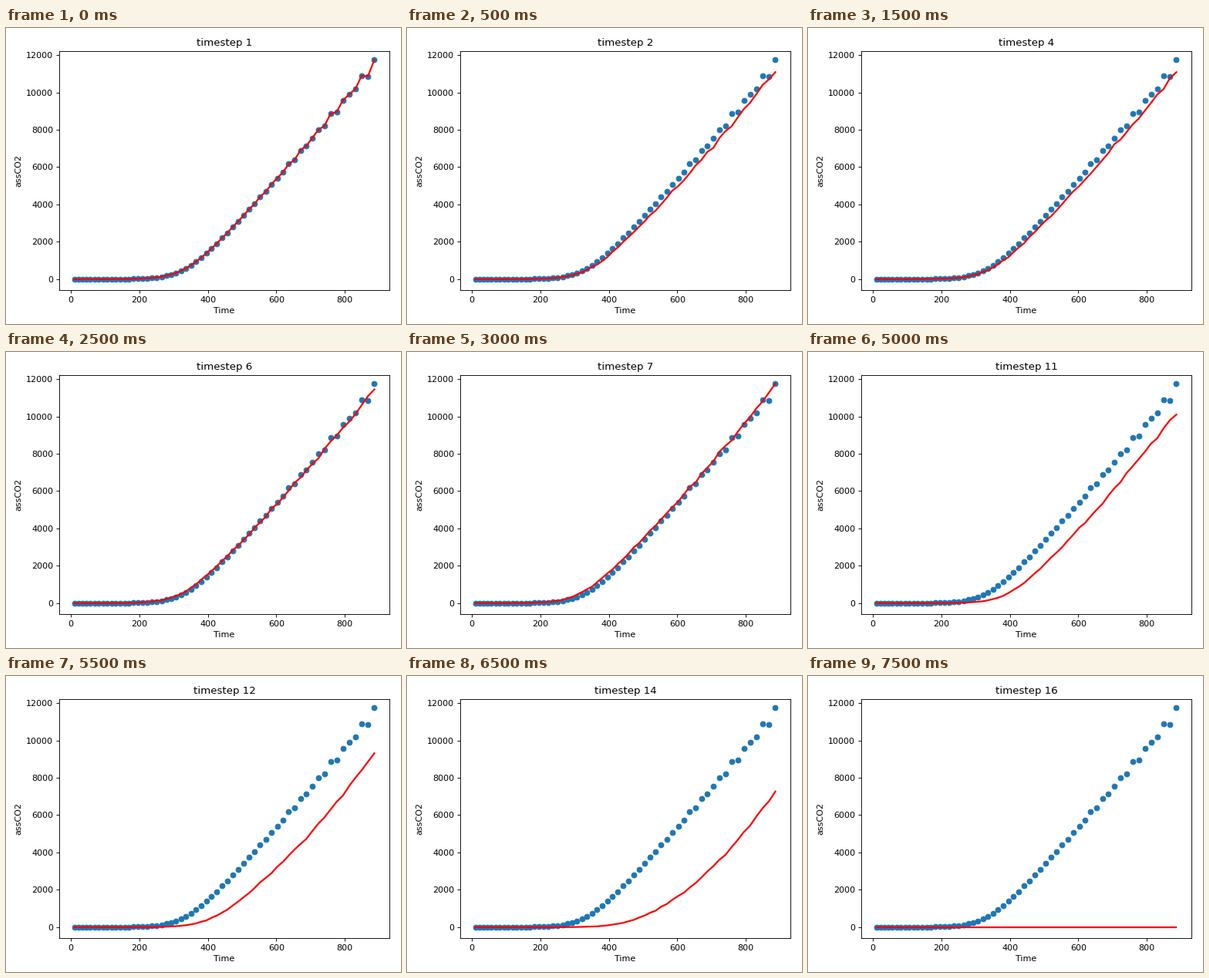
Write a matplotlib script that moves like this. It is 512 px wide and 384 px high and loops after 8 s.

```python
import numpy as np
import matplotlib.pyplot as plt
from matplotlib.animation import FuncAnimation

W, H, DPI = 512, 384, 80
STEPS, INTERVAL = 16, 500
SOFTNESS = 40

plt.rcParams["font.family"] = "DejaVu Sans"

idx = np.arange(59)
time = 10.5 + 11.47 * idx + 0.0625 * idx**2

# Onset time, slope and bend of the growth curve at the key steps
KEY_STEPS = [4, 7, 9, 11, 14, 15]
ONSET = [335, 310, 300, 390, 400, 400]
SLOPE = [17.4, 17.2, 16.0, 17.5, 3.2, 0]
BEND = [0.005, 0.0053, 0.0076, 0.0062, 0.0244, 0]


def growth(onset, slope, bend):
    """Flat start, soft turn at the onset, then a slightly bent rise."""
    u = SOFTNESS * np.log1p(np.exp((time - onset) / SOFTNESS))
    return slope * u + bend * u**2


def observations():
    y = growth(331, 19.1, 0.003)
    ripple = np.cos(2 * np.pi * (idx - 51) / 2.4)
    return y + 260 * (y / y.max()) ** 2 * ripple


def fitted(step):
    """Model run at a step; the first one follows the observations."""
    if step == 1:
        return measured
    params = [np.interp(step, KEY_STEPS, p) for p in (ONSET, SLOPE, BEND)]
    y = growth(*params)
    noise = np.random.default_rng(step).normal(0, 0.6, len(y))
    return y + noise * np.sqrt(y)


measured = observations()

fig = plt.figure(figsize=(W / DPI, H / DPI), dpi=DPI, facecolor="white")
ax = fig.add_axes([69 / W, 44 / H, 428 / W, 310 / H])
ax.scatter(time, measured)
line, = ax.plot(time, measured, color="red", linewidth=2)
ax.set_xlim(-33.5, 930)
ax.set_ylim(-583, 12211)
ax.set_xticks(range(0, 801, 200))
ax.set_yticks(range(0, 12001, 2000))
ax.set_xlabel("Time")
ax.set_ylabel("assCO2")
title = ax.set_title("timestep 1")


def update(frame):
    step = frame + 1
    line.set_ydata(fitted(step))
    title.set_text(f"timestep {step}")
    return line, title


anim = FuncAnimation(fig, update, frames=STEPS, interval=INTERVAL,
                     repeat=True, repeat_delay=0, blit=False)
plt.show()
```
